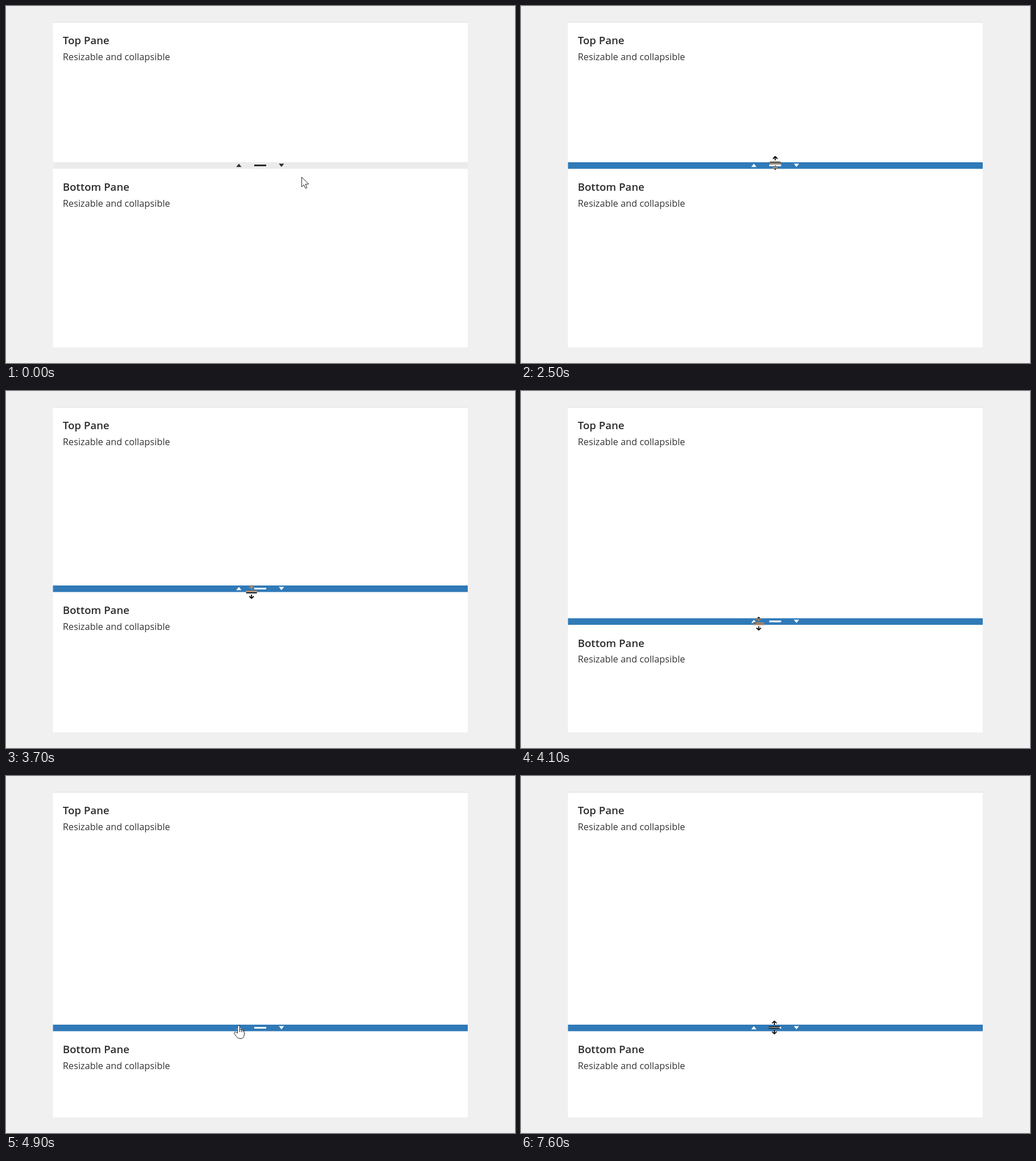
An HTML page with a canvas that plays this animation: 894x626 px, repeating every 8 s.

```html
<!DOCTYPE html>
<html lang="en">
<head>
<meta charset="utf-8">
<title>Resizable panes</title>
<style>
  html, body { margin: 0; width: 100%; height: 100%; overflow: hidden; background: #f0f0f0; }
  canvas { display: block; }
</style>
</head>
<body>
<canvas id="stage" width="894" height="626"></canvas>
<script>
const ctx = document.getElementById('stage').getContext('2d');
const LOOP = 8000, STEP = 100;
const LEFT = 82.5, RIGHT = 811, TOP = 28, BOTTOM = 598.6, BAR = 11.5;
const INK = '#2b2b2b', BLUE = '#307ab8';

// Keys are [time, value, value...]
const barKeys = [[2600, 274], [3300, 300], [3500, 313], [4100, 398.5], [4400, 420], [4800, 436]];
const pointerKeys = [[900, 519, 299.5], [1500, 451, 269.7], [1600, 448, 267], [1800, 446, 273]];
const resizeKeys = [[2600, 446.5, 275.2], [3300, 442, 309.5], [3500, 438, 325], [4100, 417.5, 408],
  [4400, 412, 425], [4800, 409, 440]];
const returnKeys = [[6000, 408.5, 437], [6300, 418, 437.5], [6900, 439, 440], [7200, 442, 441], [7300, 443, 441], [7600, 445, 441]];

// Smooth interpolation through the keys, at rest at both ends
function sample(keys, t) {
  const last = keys.length - 1;
  if (t <= keys[0][0]) return keys[0].slice(1);
  if (t >= keys[last][0]) return keys[last].slice(1);
  const i = keys.findIndex(k => k[0] > t) - 1;
  const a = keys[i], b = keys[i + 1], span = b[0] - a[0], u = (t - a[0]) / span;
  const slope = (k, d) => {
    if (k === 0 || k === last) return 0;
    const p = keys[k - 1], q = keys[k], r = keys[k + 1];
    return (q[d] - p[d]) * (r[d] - q[d]) <= 0 ? 0 : (r[d] - p[d]) / (r[0] - p[0]);
  };
  return a.slice(1).map((v, n) => {
    const d = n + 1, u2 = u * u, u3 = u2 * u;
    return v * (2 * u3 - 3 * u2 + 1) + b[d] * (3 * u2 - 2 * u3)
      + span * (slope(i, d) * (u3 - 2 * u2 + u) + slope(i + 1, d) * (u3 - u2));
  });
}

function rect(x1, y1, x2, y2, color) {
  ctx.fillStyle = color;
  ctx.fillRect(x1, y1, x2 - x1, y2 - y1);
}

function polygon(points) {
  ctx.beginPath();
  points.forEach(([x, y]) => ctx.lineTo(x, y));
  ctx.closePath();
}

function paneText(title, y) {
  ctx.fillStyle = INK;
  ctx.font = '600 18.6px "Open Sans", sans-serif';
  ctx.fillText(title, 99.7, y);
  ctx.fillStyle = '#333';
  ctx.font = '16.3px "Open Sans", sans-serif';
  ctx.fillText('Resizable and collapsible', 99.7, y + 27.3);
}

function splitter(y, background, icons) {
  rect(LEFT, y, RIGHT, y + BAR, background);
  rect(436, y + 4, 457, y + 7, icons);
  const mid = y + 5.4;
  for (const [x, dir] of [[409, 1], [483.8, -1]]) {
    polygon([[x - 4.6, mid + 2.9 * dir], [x, mid - 2.9 * dir], [x + 4.6, mid + 2.9 * dir]]);
    ctx.fill();
  }
}

function drawAt([x, y], draw) {
  ctx.save();
  ctx.translate(x, y);
  ctx.lineJoin = 'round';
  ctx.lineWidth = 1;
  draw();
  ctx.restore();
}

function outlined() {
  ctx.fillStyle = '#fff';
  ctx.fill();
  ctx.strokeStyle = '#222';
  ctx.stroke();
}

function pointer() {
  polygon([[0.3, 0.5], [0.3, 17.7], [4.2, 14], [7, 20.3], [9.7, 19.2], [7, 13], [12.7, 12.6]]);
  outlined();
}

function hand() {
  ctx.beginPath();
  ctx.moveTo(-2, 14);
  ctx.lineTo(-2, 2.2);
  ctx.quadraticCurveTo(-1.8, 0.5, 0, 0.5);
  ctx.quadraticCurveTo(1.8, 0.5, 2, 2.2);
  ctx.lineTo(2, 7.5);
  ctx.quadraticCurveTo(4.5, 6.5, 5, 8.3);
  ctx.quadraticCurveTo(7.3, 7.5, 7.8, 9.2);
  ctx.quadraticCurveTo(10, 8.8, 10, 11.5);
  ctx.lineTo(10, 16);
  ctx.quadraticCurveTo(9.5, 23.5, 3.5, 23.5);
  ctx.quadraticCurveTo(-2, 23.5, -4, 19.8);
  ctx.lineTo(-7.6, 14.2);
  ctx.quadraticCurveTo(-8.2, 12, -6, 11.8);
  ctx.quadraticCurveTo(-4, 12, -2, 14.2);
  outlined();
  ctx.beginPath();
  [[2, 7.5], [5, 8.3], [7.8, 9.2]].forEach(([x, y]) => {
    ctx.moveTo(x, y);
    ctx.lineTo(x, 12);
  });
  ctx.stroke();
}

function resizeShape() {
  ctx.beginPath();
  for (const s of [-1, 1]) {
    ctx.moveTo(-4, 7.3 * s);
    ctx.lineTo(0, 11.2 * s);
    ctx.lineTo(4, 7.3 * s);
    ctx.moveTo(0, 11 * s);
    ctx.lineTo(0, 4.5 * s);
    ctx.moveTo(-9.5, 1.4 * s);
    ctx.lineTo(9.5, 1.4 * s);
  }
  ctx.stroke();
}

function invertedResize() {
  ctx.globalCompositeOperation = 'difference';
  ctx.strokeStyle = '#fff';
  ctx.lineWidth = 1.8;
  resizeShape();
}

function solidResize() {
  ctx.strokeStyle = '#111';
  ctx.lineWidth = 1.8;
  resizeShape();
}

function cursor(t) {
  if (t < 1900) drawAt(sample(pointerKeys, t), pointer);
  else if (t < 4800) drawAt(sample(resizeKeys, t), invertedResize);
  else drawAt(sample(returnKeys, t), t < 6300 ? hand : solidResize);
}

function barColor(t) {
  if (t >= 2500) return BLUE;
  const shade = Math.round(235 - 11 * Math.min(1, Math.max(0, (t - 1500) / 400)));
  return `rgb(${shade},${shade},${shade})`;
}

function render(t) {
  rect(0, 0, 894, 626, '#f0f0f0');
  rect(LEFT, TOP, RIGHT, BOTTOM, '#fff');
  rect(LEFT, TOP, RIGHT, TOP + 1, '#dedede');
  const y = Math.round(sample(barKeys, t)[0] * 2) / 2;
  paneText('Top Pane', 67.2);
  paneText('Bottom Pane', y + 50.2);
  splitter(y, barColor(t), t >= 2500 ? '#fff' : INK);
  cursor(t);
}

function tick() {
  const t = performance.now() % LOOP;
  render(Math.floor(t / STEP) * STEP);
  requestAnimationFrame(tick);
}
tick();
</script>
</body>
</html>
```
